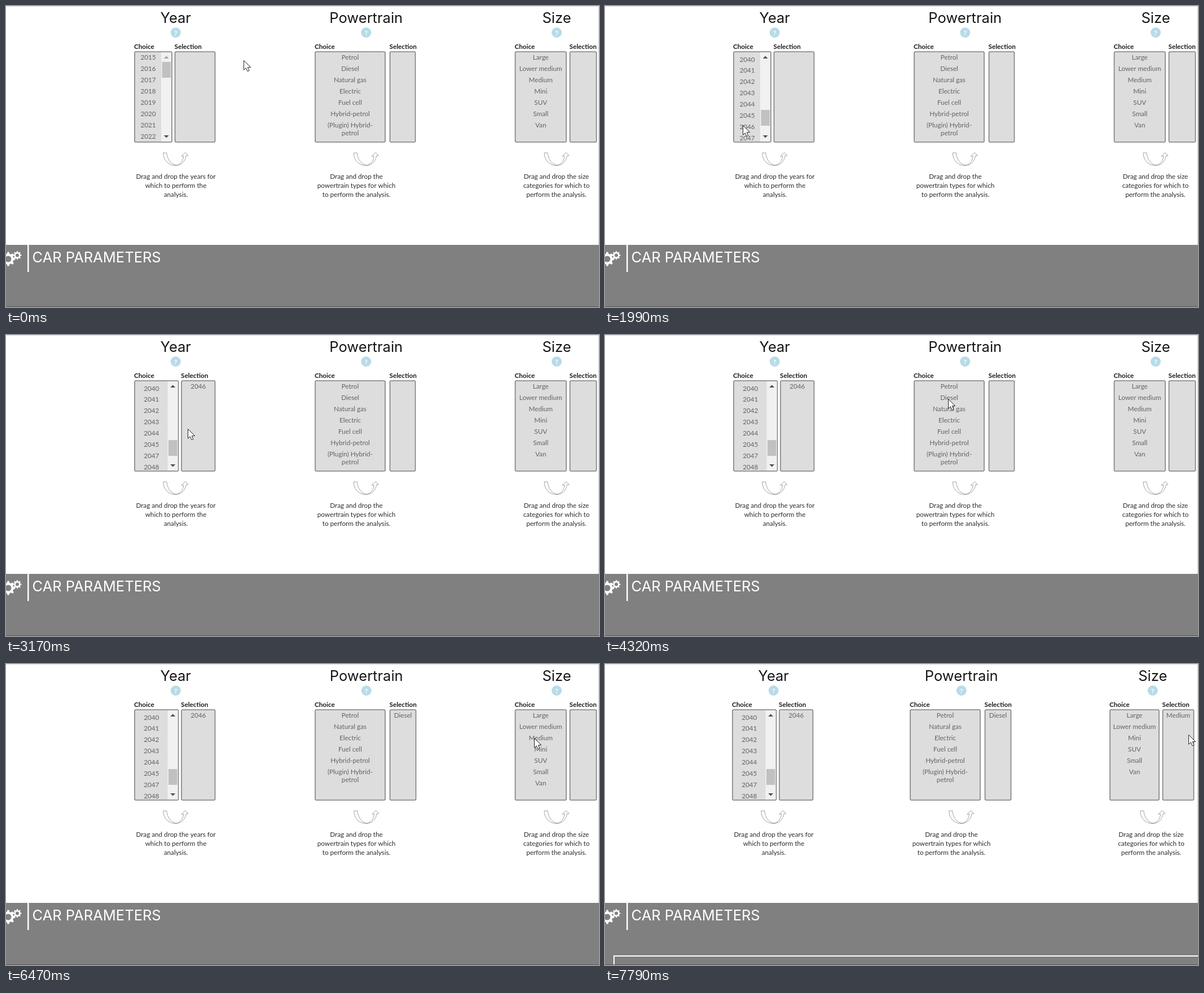
Write an HTML page with a canvas that moves like this. It is 1051 px wide and 533 px high and loops after 8000 ms.

```html
<!DOCTYPE html>
<html lang="en">
<head>
<meta charset="utf-8">
<title>Drag and drop choices</title>
<style>
  html, body { margin: 0; width: 100%; height: 100%; overflow: hidden; background: #fff; }
  canvas { display: block; width: 1051px; height: 533px; }
</style>
</head>
<body>
<canvas id="stage"></canvas>
<script>
const W = 1051, H = 533, LOOP = 8000, STEP = 77;
const TOP = 80, BOTTOM = 242, ROW = 19.93, BASE = 95, SCROLL = 494.75;
const BODY = '11.7px Lato, "Open Sans", sans-serif';
const BOLD = '700 11.7px Lato, "Open Sans", sans-serif';
const TITLE = '400 25.5px Montserrat, Inter, sans-serif';

const canvas = document.getElementById('stage');
const ctx = canvas.getContext('2d');
const dpr = window.devicePixelRatio || 1;
canvas.width = W * dpr;
canvas.height = H * dpr;

const smooth = p => p * p * (3 - 2 * p);
const easeOut = p => p * (2 - p);

const START = { x: 421, y: 96 };
const MOVES = [
  { from: 520, to: 1060, x: 244, y: 211, sag: 80 },
  { from: 2470, to: 3020, x: 322, y: 166 },
  { from: 3480, to: 4320, x: 608, y: 113 },
  { from: 4630, to: 5410, x: 688, y: 102 },
  { from: 6010, to: 6472, x: 936, y: 131 },
  { from: 6870, to: 7410, x: 1012, y: 123, ease: easeOut },
  { from: 7560, to: 7790, x: 1034, y: 125 }
];

// Widths hold the value before and after the column has its selection
const COLUMNS = [
  { title: 'Year', left: 227, shift: -2, choice: [68, 79.5], gap: 3.5, selection: [73, 61.5],
    items: Array.from({ length: 36 }, (_, i) => String(2015 + i)), pick: '2046', press: 2470, drop: 3170,
    note: ['Drag and drop the years for', 'which to perform the', 'analysis.'] },
  { title: 'Powertrain', left: 547, shift: -7, choice: [126, 126], gap: 6.5, selection: [47, 48],
    items: ['Petrol', 'Diesel', 'Natural gas', 'Electric', 'Fuel cell', 'Hybrid-petrol', '(Plugin) Hybrid-\npetrol'],
    pick: 'Diesel', press: 4630, drop: 5470,
    note: ['Drag and drop the', 'powertrain types for which', 'to perform the analysis.'] },
  { title: 'Size', left: 901.5, shift: -7.5, choice: [92.5, 89], gap: 4.5, selection: [49, 57],
    items: ['Large', 'Lower medium', 'Medium', 'Mini', 'SUV', 'Small', 'Van'],
    pick: 'Medium', press: 6620, drop: 7560,
    note: ['Drag and drop the size', 'categories for which to', 'perform the analysis.'] }
];

// Share of a stepped change that is done; its first step shows at once
function progress(t, from, to) {
  if (t < from) return 0;
  const count = Math.round((to - from) / STEP) + 1;
  return Math.min(1, Math.floor((t - from) / STEP + 1.1) / count);
}

function pointer(t) {
  let { x, y } = START;
  for (const m of MOVES) {
    const p = progress(t, m.from, m.to), e = (m.ease || smooth)(p);
    x += (m.x - x) * e;
    y += (m.y - y) * e + (m.sag || 0) * Math.sin(Math.PI * e);
  }
  return { x: Math.round(x), y: Math.round(y) };
}

function text(str, x, y, font, color, align = 'center') {
  ctx.font = font;
  ctx.fillStyle = color;
  ctx.textAlign = align;
  ctx.fillText(str, x, y);
}

function rect(x, y, w, h, color) {
  ctx.fillStyle = color;
  ctx.fillRect(x, y, w, h);
}

function outline(x, y, w, h, color) {
  ctx.lineWidth = 1;
  ctx.strokeStyle = color;
  ctx.strokeRect(x + 0.5, y + 0.5, w - 1, h - 1);
}

function poly(points, fill, stroke) {
  ctx.beginPath();
  points.forEach(([x, y]) => ctx.lineTo(x, y));
  ctx.closePath();
  ctx.fillStyle = fill;
  ctx.fill();
  if (!stroke) return;
  ctx.strokeStyle = stroke;
  ctx.lineWidth = 1;
  ctx.stroke();
}

function disc(x, y, r, color) {
  ctx.beginPath();
  ctx.arc(x, y, r, 0, Math.PI * 2);
  ctx.fillStyle = color;
  ctx.fill();
}

function gear(cx, cy, r, hole) {
  const corners = 32;
  ctx.beginPath();
  for (let i = 0; i < corners; i++) {
    const a = (i - 0.5) / corners * Math.PI * 2;
    const d = i % 4 < 2 ? r : r * 0.74;
    ctx.lineTo(cx + d * Math.cos(a), cy + d * Math.sin(a));
  }
  ctx.closePath();
  ctx.moveTo(cx + hole, cy);
  ctx.arc(cx, cy, hole, 0, Math.PI * 2);
  ctx.fillStyle = '#fff';
  ctx.fill('evenodd');
}

const swoosh = new Path2D('M-22 260H-16C-15 273-7 281 1 282C8 281 13 274 14 266H10L17 259.5' +
  'L22 265H18.5C17 275 10 282 0 282.5C-13 282.5-22 273-22 260Z');

function drawSwoosh(cx) {
  ctx.save();
  ctx.translate(cx, 0);
  ctx.lineWidth = 0.8;
  ctx.strokeStyle = '#8a8a8a';
  ctx.stroke(swoosh);
  ctx.restore();
}

function box(left, right, open, hover) {
  ctx.save();
  ctx.beginPath();
  ctx.roundRect(left + 1, TOP + 1, right - left - 2, BOTTOM - TOP - 2, 2);
  if (hover) { ctx.shadowColor = '#8fb0e6'; ctx.shadowBlur = 4 * dpr; }
  ctx.fillStyle = open ? '#fff' : '#ddd';
  ctx.fill();
  ctx.lineWidth = 1.6;
  ctx.strokeStyle = open ? '#5b82c2' : '#808080';
  ctx.stroke();
  ctx.restore();
}

function scrollbar(right, scroll, count) {
  const x = right - 20, mid = x + 9.2;
  rect(x, TOP + 2, 18, BOTTOM - TOP - 4, '#f1f1f1');
  rect(x + 1.5, Math.floor(99 + 124 * scroll / (count * 20)), 15.5, 28, '#c1c1c1');
  poly([[mid - 4.5, 93], [mid + 4.5, 93], [mid, 88.5]], scroll ? '#505050' : '#a3a3a3');
  poly([[mid - 4.5, 229], [mid + 4.5, 229], [mid, 233.5]], '#505050');
}

function drawColumn(col, s) {
  const done = s.t >= col.drop, after = Number(done);
  const settled = s.t >= COLUMNS[2].drop;
  const left = col.left + (settled ? col.shift : 0);
  const right = left + col.choice[after];
  const selLeft = right + col.gap, selRight = selLeft + col.selection[after];
  const mid = (left + selRight) / 2 + 1.5;
  const source = s.drag === col, scrolls = col === COLUMNS[0];
  const over = (a, b) => s.drag && s.x >= a && s.x < b - 2 && s.y > TOP && s.y < BOTTOM;

  text(col.title, mid, 30, TITLE, '#161616');
  disc(mid, 47, 9, '#b8dbe8');
  text('?', mid, 51.5, BOLD, '#fff');
  text('Choice', left, 76, BOLD, '#1c1c1c', 'left');
  text('Selection', selLeft, 76, BOLD, '#1c1c1c', 'left');

  box(left, right, s.drag && !source, !source && over(left, right));
  box(selLeft, selRight, !!s.drag, over(selLeft, selRight));
  s.inside = s.inside || over(left, right) || over(selLeft, selRight);

  const items = col.items.filter(name => !done || name !== col.pick);
  const scroll = scrolls ? s.scroll : 0;
  const center = (left + right - (scrolls ? 18 : 0)) / 2;
  ctx.save();
  ctx.beginPath();
  ctx.rect(left + 1, TOP + 2, right - left - 2, BOTTOM - TOP - 4);
  ctx.clip();
  items.forEach((name, n) => {
    const base = Math.round(BASE + n * ROW - scroll);
    const active = source && col.pick === name;
    if (active) {
      const width = 2 * (center - left - 2);
      rect(left + 1, base - 15, width + 2, 21, '#89a9dc');
      outline(left + 1, base - 15, width + 2, 21, '#4b73b8');
      s.ghost = { x: left + 2, y: base - 14, w: width, name };
    }
    name.split('\n').forEach((line, i) =>
      text(line, center, base + i * 14, BODY, active ? '#fff' : '#636363'));
  });
  ctx.restore();
  if (scrolls) scrollbar(right, scroll, items.length);
  if (done) text(col.pick, (selLeft + selRight) / 2, BASE, BODY, '#636363');

  drawSwoosh(mid);
  col.note.forEach((line, n) => text(line, left + 74, Math.round(305.8 + n * 16.3), BODY, '#2b2b2b'));
}

function drawGhost({ ghost: g, drag, x, y }) {
  // The drag image hangs at two thirds of the grab offset
  const grab = pointer(drag.press - 1);
  const gx = x - (grab.x - g.x) * 2 / 3, gy = y - (grab.y - g.y) * 2 / 3;
  ctx.save();
  ctx.globalAlpha = 0.75;
  rect(gx, gy, g.w, 18.5, '#89a9dc');
  outline(gx, gy, g.w, 18.5, '#7b9bd0');
  ctx.globalAlpha = 0.95;
  text(g.name, gx + g.w / 2, gy + 13, BODY, '#fff');
  ctx.restore();
}

function drawPointer({ x, y, held, drag, inside }) {
  if (held) disc(x - 0.5, y, 13, 'rgba(226,224,64,0.82)');
  if (drag && !inside) {
    ctx.lineWidth = 2.6;
    ctx.strokeStyle = '#5e5d1e';
    ctx.beginPath();
    ctx.arc(x, y, 9.2, 0, Math.PI * 2);
    ctx.moveTo(x - 6.5, y - 6.5);
    ctx.lineTo(x + 6.5, y + 6.5);
    ctx.stroke();
    return;
  }
  if (drag) outline(x + 2, y + 16, 13, 10, '#666');
  const arrow = [[0.5, 0.5], [0.5, 17.2], [4.3, 13.8], [7.1, 19.8], [9.9, 18.5], [7.3, 12.7], [12.6, 12.5]];
  poly(arrow.map(([a, b]) => [x + a, y + b]), held ? '#f8f8b0' : '#fff', '#222');
}

function drawBand(panel) {
  rect(0, 423, W, H - 423, '#808080');
  gear(4, 448, 12.5, 5.5);
  gear(20, 441.5, 7.5, 3);
  rect(38, 423, 2.5, 48, '#fff');
  text('CAR PARAMETERS', 46.5, 454, TITLE, '#fff', 'left');
  if (panel) {
    rect(15, 516, W - 15, 2, '#fff');
    rect(15, 516, 2, H - 516, '#fff');
  }
  rect(0, H - 1, W, 1, '#555');
}

function draw(t) {
  const held = COLUMNS.find(c => t >= c.press && t < c.drop);
  const s = {
    t, held, ...pointer(t),
    drag: held && t >= held.press + STEP ? held : null,
    scroll: SCROLL * progress(t, 1380, 1990),
    inside: false, ghost: null
  };
  ctx.setTransform(dpr, 0, 0, dpr, 0, 0);
  rect(0, 0, W, H, '#fff');
  rect(0, 0, W, 1, '#dcdcdc');
  rect(W - 1, 0, 1, 423, '#cfcfcf');
  COLUMNS.forEach(col => drawColumn(col, s));
  drawBand(t >= COLUMNS[2].drop + STEP);
  if (s.ghost) drawGhost(s);
  drawPointer(s);
}

function tick() {
  draw(performance.now() % LOOP);
  requestAnimationFrame(tick);
}
tick();
</script>
</body>
</html>
```
